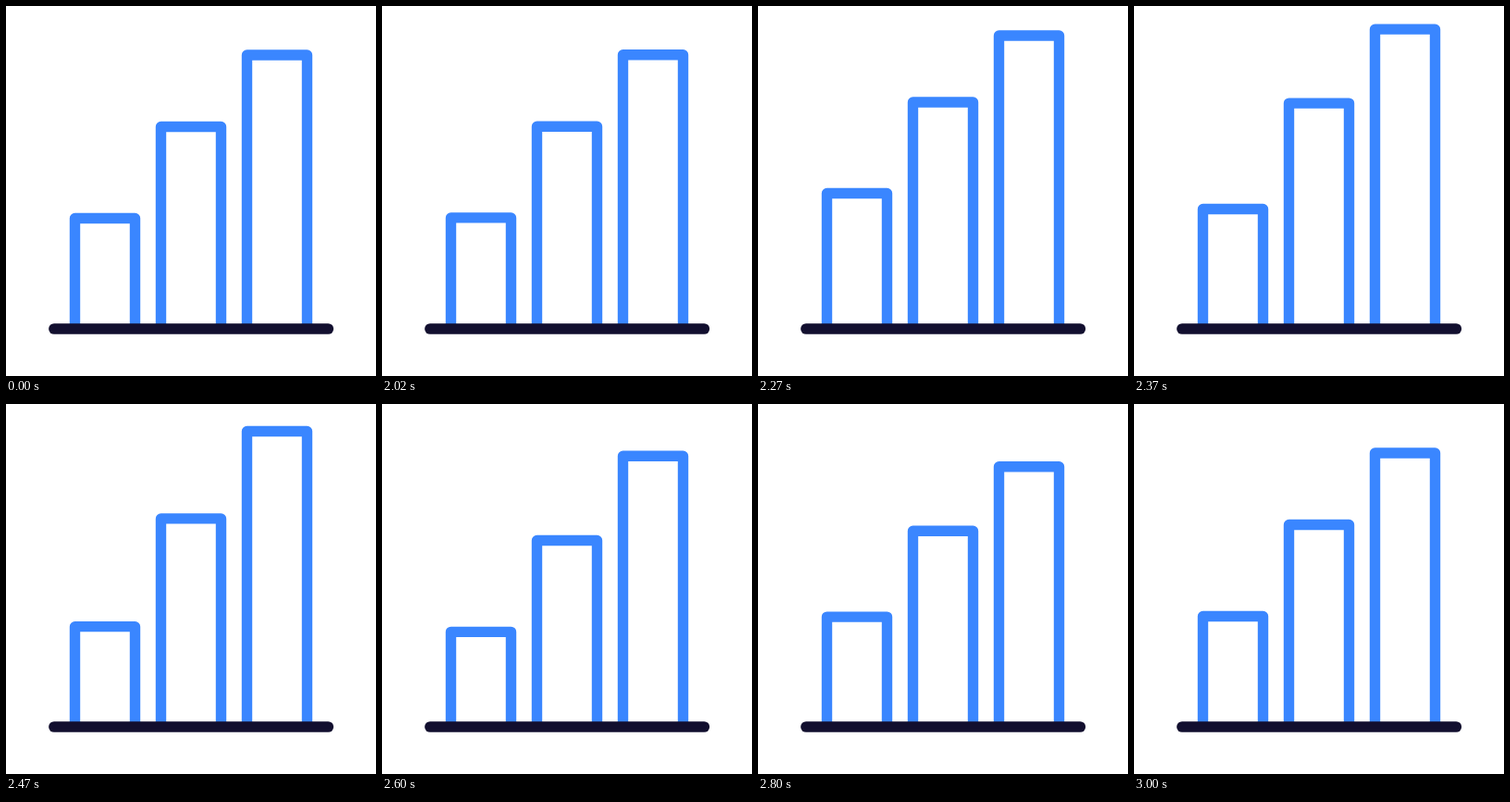
These frames come from a looping animation (400x400 px, 3020 ms). An HTML page:

```html
<!DOCTYPE html>
<html lang="en">
<head>
<meta charset="utf-8">
<title>Bar chart</title>
<style>
  html, body { margin: 0; height: 100%; overflow: hidden; background: #fff; }
  svg { display: block; width: 100vw; height: 100vh; }
  path { fill: none; stroke-linejoin: round; stroke-linecap: round; }
  .bar { stroke: #3a86ff; stroke-width: 11.4; }
  .base { stroke: #120f2f; stroke-width: 11.7; }
</style>
</head>
<body>
<svg viewBox="0 0 400 400">
  <path class="bar"/>
  <path class="bar"/>
  <path class="bar"/>
  <path class="base" d="M52 349H348.3"/>
</svg>
<script>
const LOOP = 3020, START = 2000, FALL = 312, SETTLE = 282;
const RISE_BY = -28.5, DIP_BY = 18.5;
const bars = [
  { x: 74.5, top: 229.5, peak: 2236 },
  { x: 167.5, top: 130.5, peak: 2321 },
  { x: 260.5, top: 53, peak: 2407 },
];
const paths = document.querySelectorAll('.bar');

function ease(t, from, to, a, b) {
  const p = Math.min(1, Math.max(0, (t - from) / (to - from)));
  return a + (b - a) * p * p * (3 - 2 * p);
}

// All bars rise together, peak one after another, dip and settle.
function offset(t, peak) {
  const low = peak + FALL;
  if (t < peak) return ease(t, START, peak, 0, RISE_BY);
  if (t < low) return ease(t, peak, low, RISE_BY, DIP_BY);
  return ease(t, low, low + SETTLE, DIP_BY, 0);
}

// The motion advances in steps of 25 ms.
function hold(t) {
  if (t < 2020) return 0;
  const from = t < 2550 ? 2020 : 2550;
  return from + Math.floor((t - from) / 25) * 25;
}

function draw() {
  const t = hold(performance.now() % LOOP);
  bars.forEach(({ x, top, peak }, i) => {
    const y = top + offset(t, peak);
    paths[i].setAttribute('d', `M${x} 348V${y}h65V348`);
  });
  requestAnimationFrame(draw);
}
draw();
</script>
</body>
</html>
```
